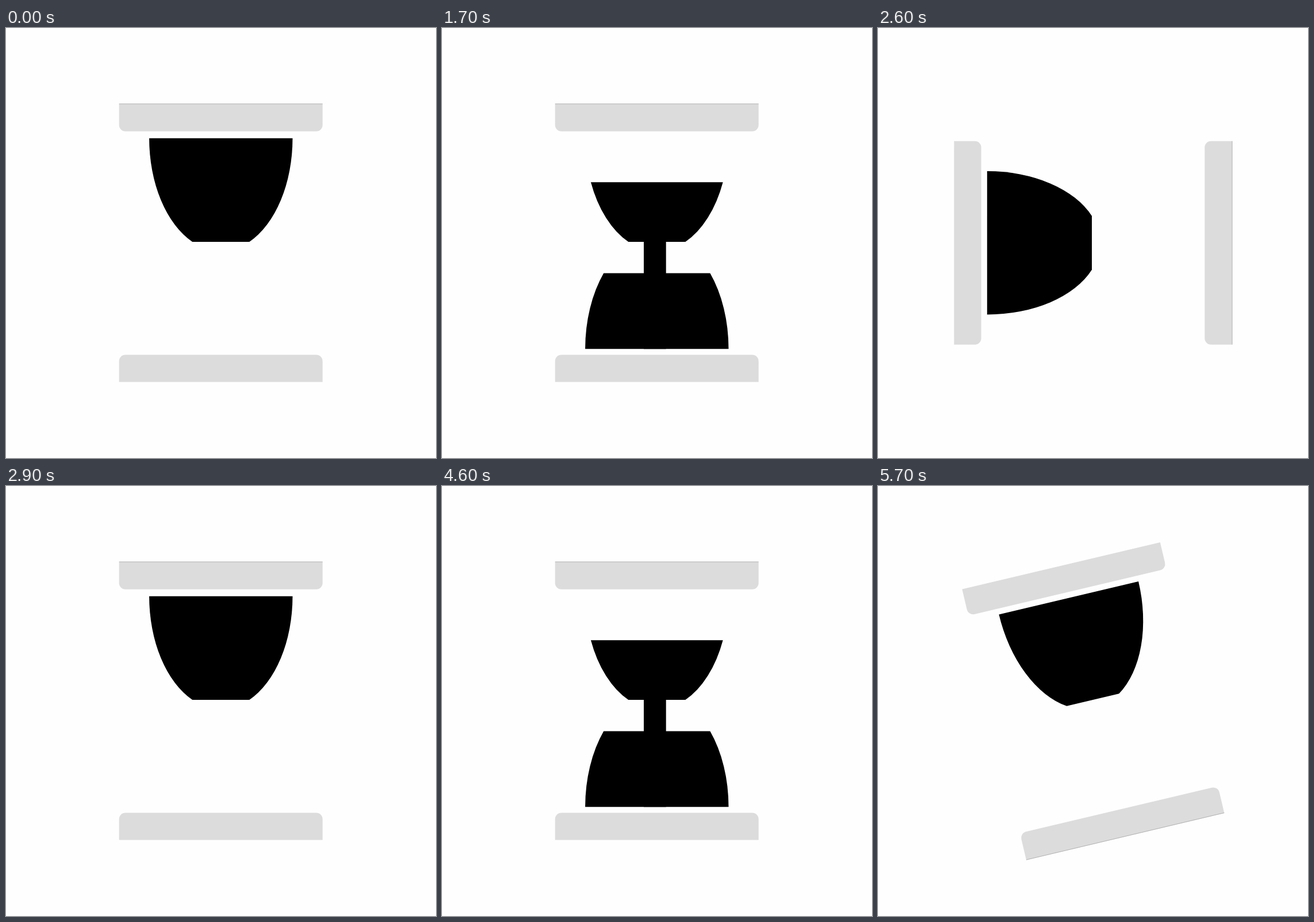
Animation of 748x748 px, one loop 5810 ms. Source, as an HTML page with a canvas:

```html
<!DOCTYPE html>
<html lang="en">
<head>
<meta charset="utf-8">
<title>Hourglass</title>
<style>
  html, body { margin: 0; height: 100%; overflow: hidden; background: #fefefe; }
  canvas { display: block; }
</style>
</head>
<body>
<canvas id="stage" width="748" height="748"></canvas>
<script>
const ctx = document.getElementById('stage').getContext('2d');
const LOOP = 5810, TURN = 2900, STEP = 100;
const CENTER = 374, MID_X = 373.8;
const BOWL = { rx: 124.7, ry: 196.5 };
const TOP = { rim: 191.7, depth: 180.3 };
const BOTTOM = { rim: 558.2, depth: 182.2 };
const NECK = TOP.rim + TOP.depth;

// Linear progress from start to end, clamped to 0..1
const progress = (t, start, end) => Math.min(1, Math.max(0, (t - start) / (end - start)));
const smooth = x => x * x * (3 - 2 * x);

// Slice of a bowl between two distances from its rim; dir is 1 downwards, -1 upwards
function bowl(rim, dir, from, to) {
  if (to - from < 0.1) return;
  const a = Math.asin(from / BOWL.ry) * dir;
  const b = Math.asin(to / BOWL.ry) * dir;
  ctx.beginPath();
  ctx.ellipse(MID_X, rim, BOWL.rx, BOWL.ry, 0, a, b, dir < 0);
  ctx.ellipse(MID_X, rim, BOWL.rx, BOWL.ry, 0, Math.PI - b, Math.PI - a, dir < 0);
  ctx.fill();
}

function bar(y, height, radii) {
  ctx.beginPath();
  ctx.roundRect(196.7, y, 354, height, radii);
  ctx.fill();
}

function draw(t) {
  ctx.fillStyle = '#fefefe';
  ctx.fillRect(0, 0, 748, 748);
  ctx.save();
  ctx.translate(CENTER, CENTER);
  ctx.rotate(Math.PI * smooth(progress(t, 2300, 2900)));
  ctx.translate(-CENTER, -CENTER);

  ctx.fillStyle = '#dcdcdc';
  bar(131.7, 48, [0, 0, 11, 11]);
  bar(568.5, 47.2, [11, 11, 0, 0]);
  ctx.fillStyle = '#b4b4b4';
  ctx.fillRect(196.7, 131.5, 354, 1);

  ctx.fillStyle = '#000';
  bowl(TOP.rim, 1, TOP.depth * progress(t, 1207, 2370), TOP.depth);
  bowl(BOTTOM.rim, -1, 0, BOTTOM.depth * progress(t, 893, 2010));

  const fall = 558.8 - NECK;
  const head = NECK + fall * progress(t, 300, 900);
  const tail = NECK + fall * progress(t, 2300, 2600);
  ctx.fillRect(351, tail - 0.5, 38.7, head - tail);
  ctx.restore();
}

function tick(now) {
  const t = Math.min(now % LOOP, 2 * TURN - 1);
  draw(Math.floor(t / STEP) * STEP % TURN);
  requestAnimationFrame(tick);
}
requestAnimationFrame(tick);
</script>
</body>
</html>
```
